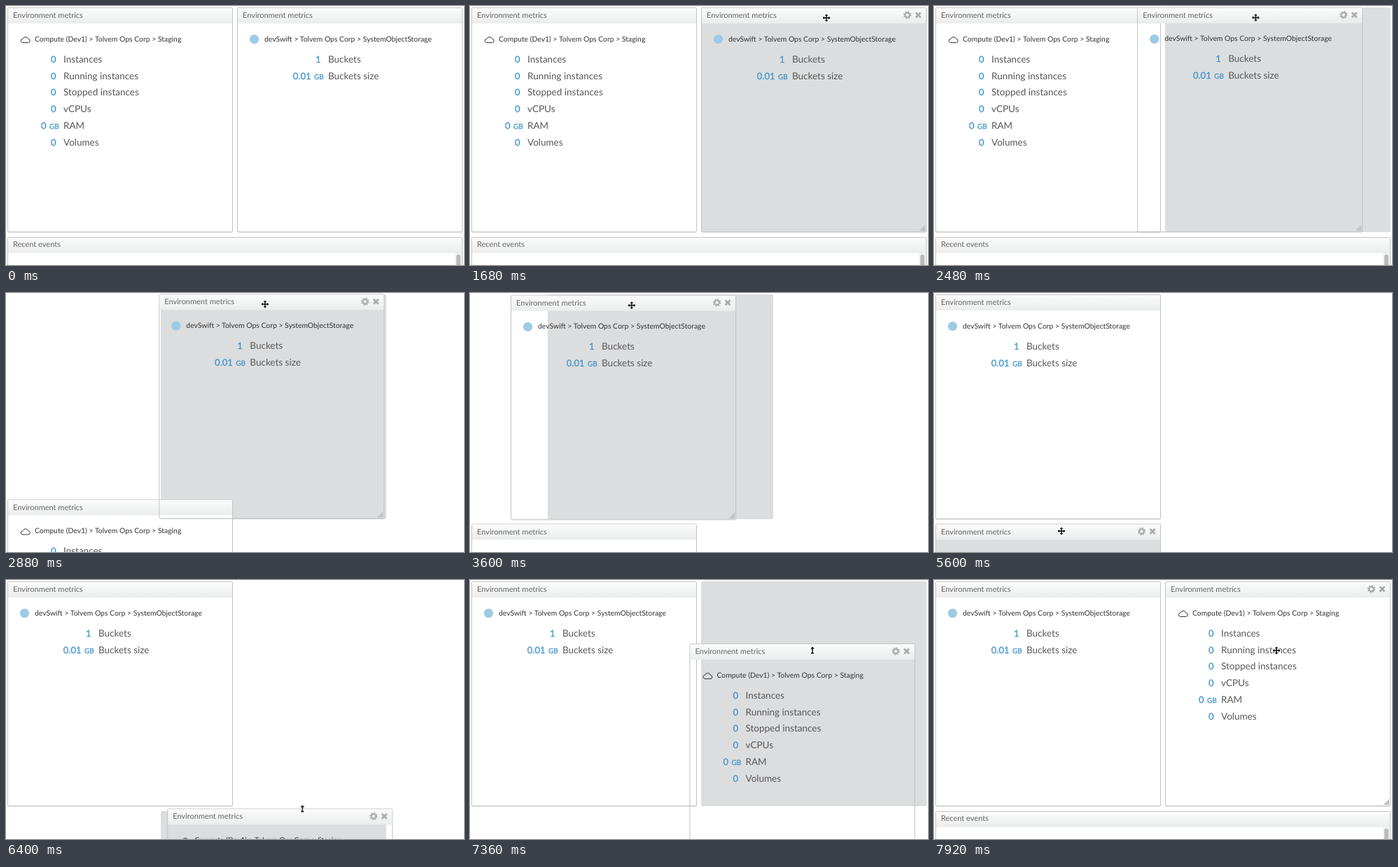
These frames come from a looping animation (654x371 px, 8 s). An HTML page:

```html
<!DOCTYPE html>
<html lang="en">
<head>
<meta charset="utf-8">
<title>Dashboard widgets</title>
<style>
html, body { margin: 0; width: 100%; height: 100%; overflow: hidden; background: #fff; }
.stage { position: relative; width: 654px; height: 371px; overflow: hidden; background: #fff; }

.panel, .slot { position: absolute; top: 2px; left: 2px; box-sizing: border-box; width: 322px; height: 322px; border-radius: 2px; }
.panel { border: 1px solid #c3c4c4; background: #fff; box-shadow: 0 1px 1px rgba(0,0,0,.1); }
.panel::before { content: ""; position: absolute; inset: 0 0 auto; height: 22px; background: linear-gradient(#fbfbfb, #ebeded); }
.panel svg { position: absolute; left: -1px; top: -1px; width: 100%; height: 100%; overflow: visible; }

text { font: 13.5px Lato, "Open Sans", sans-serif; fill: #585858; text-rendering: geometricPrecision; }
.title { font-size: 11px; fill: #666; }
.path { font-size: 10.4px; fill: #333; }
.num { font-size: 13px; text-anchor: end; fill: #3a92cc; stroke: #3a92cc; stroke-width: .25; }
.unit { font-size: 10px; fill: #3a92cc; stroke: #3a92cc; stroke-width: .25; }
.tools { fill: none; stroke: #a6a7a7; }

.slot { background: #dcddde; opacity: 0; animation: slot 8s step-end infinite; }
#compute { z-index: 1; animation: compute 8s infinite, computeLift 8s step-end infinite; }
#buckets { left: 330px; z-index: 2; animation: buckets 8s infinite, bucketsLift 8s step-end infinite; }
#events { top: 331px; width: 650px; height: 200px; animation: events 8s infinite; }
#events i { position: absolute; right: 0; top: 22px; width: 10px; bottom: 0; background: #f2f2f2; }
#events i::after { content: ""; position: absolute; left: 2px; top: 2px; width: 6px; height: 90px; border-radius: 3px; background: #b9baba; }
#compute .tools { animation: computeTools 8s linear infinite; }
#buckets .tools { animation: bucketsTools 8s linear infinite; }

.pointer { position: absolute; left: 0; top: 0; z-index: 9; overflow: visible; animation: pointer 8s infinite; }
.pointer path { stroke: #fff; stroke-width: 1.4; paint-order: stroke; }
.cross { animation: cross 8s step-end infinite; }
.up { animation: up 8s step-end infinite; }

@keyframes buckets {
  0%, 25% { transform: none; animation-timing-function: cubic-bezier(.4,0,.75,.65); }
  36% { transform: translate(-111.5px,-.7px); animation-timing-function: cubic-bezier(.3,.25,.7,.75); }
  47% { transform: translate(-304px,1px); animation-timing-function: ease-out; }
  53%, 56% { transform: translate(-329px,1.5px); }
  57.5%, 100% { transform: translate(-328px,0); }
}
@keyframes bucketsLift {
  0%, 55%, 100% { background: #fff; }
  20.8% { background: transparent; }
}
@keyframes bucketsTools {
  0%, 11% { opacity: 0; }
  14%, 60% { opacity: 1; }
  61.5%, 100% { opacity: 0; }
}
@keyframes compute {
  0%, 32.95% { transform: none; }
  37.95%, 72.5% { transform: translate(0,328.5px); animation-timing-function: cubic-bezier(.4,0,.75,.75); }
  80% { transform: translate(228px,325.5px); animation-timing-function: linear; }
  83.5% { transform: translate(300px,297px); animation-timing-function: cubic-bezier(.3,.2,.6,1); }
  92%, 96.3% { transform: translate(311.5px,89px); }
  98.8%, 100% { transform: translate(328px,0); }
}
@keyframes computeLift {
  0% { background: #fff; z-index: 1; }
  70% { background: transparent; z-index: 3; }
  96.3%, 100% { background: #fff; z-index: 3; }
}
@keyframes computeTools {
  0%, 65% { opacity: 0; }
  66.5%, 100% { opacity: 1; }
}
@keyframes events {
  0%, 32.95% { transform: none; }
  37.95%, 96.3% { transform: translate(0,328px); }
  98.8%, 100% { transform: none; }
}
@keyframes slot {
  0% { opacity: 0; }
  20.8% { opacity: 1; transform: translate(328px,0); }
  32.5% { opacity: 1; transform: translate(219px,0); }
  39.5% { opacity: 1; transform: translate(109px,0); }
  45.5% { opacity: 1; transform: none; }
  55% { opacity: 0; transform: none; }
  70% { opacity: 1; transform: translate(0,329px); }
  75.5% { opacity: 1; transform: translate(109px,329px); }
  78% { opacity: 1; transform: translate(219px,329px); }
  82% { opacity: 1; transform: translate(328px,0); }
  96.3%, 100% { opacity: 0; }
}
@keyframes pointer {
  0%, 4% { transform: translate(560px,4px); opacity: 0; }
  5% { opacity: 1; }
  14%, 25% { transform: translate(509px,17px); animation-timing-function: cubic-bezier(.4,0,.75,.65); }
  36% { transform: translate(370px,16px); animation-timing-function: cubic-bezier(.3,.25,.7,.75); }
  47% { transform: translate(203px,18px); animation-timing-function: ease-out; }
  53%, 59% { transform: translate(180px,18px); animation-timing-function: ease-in-out; }
  67%, 72.5% { transform: translate(182px,341px); animation-timing-function: cubic-bezier(.4,0,.75,.75); }
  80% { transform: translate(423px,328px); animation-timing-function: linear; }
  83.5% { transform: translate(482px,302px); animation-timing-function: cubic-bezier(.3,.2,.6,1); }
  92%, 100% { transform: translate(489px,101px); opacity: 1; }
}
@keyframes cross { 0%, 96.3%, 100% { opacity: 1; } 79.5% { opacity: 0; } }
@keyframes up { 0%, 96.3%, 100% { opacity: 0; } 79.5% { opacity: 1; } }
</style>
</head>
<body>
<div class="stage">
  <div class="slot"></div>

  <div class="panel" id="events">
    <svg><text class="title" x="8" y="14.3">Recent events</text></svg>
    <i></i>
  </div>

  <div class="panel" id="compute">
    <svg>
      <text class="title" x="8" y="15">Environment metrics</text>
      <path d="M21.5 50.5h8a2.6 2.6 0 0 0 .4-5.2 4.2 4.2 0 0 0-7.9-.3 2.8 2.8 0 0 0-.5 5.5z" fill="none" stroke="#333"/>
      <text class="path" x="39" y="48.5">Compute (Dev1) &gt; Tolvem Ops Corp &gt; Staging</text>
      <g class="rows" data-x="80" data-rows="0||Instances;0||Running instances;0||Stopped instances;0||vCPUs;0|GB|RAM;0||Volumes"></g>
      <g class="tools"></g>
    </svg>
  </div>

  <div class="panel" id="buckets">
    <svg>
      <text class="title" x="8" y="15">Environment metrics</text>
      <circle cx="24.5" cy="45.7" r="6.6" fill="#9ccbe5"/>
      <text class="path" x="39" y="48.5">devSwift &gt; Tolvem Ops Corp &gt; SystemObjectStorage</text>
      <g class="rows" data-x="130" data-rows="1||Buckets;0.01|GB|Buckets size"></g>
      <g class="tools"></g>
    </svg>
  </div>

  <svg class="pointer" width="1" height="1">
    <path class="cross" d="M0-5.5L2.3-3H.7V-.7H3V-2.3L5.5 0 3 2.3V.7H.7V3H2.3L0 5.5-2.3 3H-.7V.7H-3V2.3L-5.5 0-3-2.3V-.7H-.7V-3H-2.3Z"/>
    <path class="up" d="M0-5.5L2.8-2.6H.7V3H2V4.5H-2V3H-.7V-2.6H-2.8Z"/>
  </svg>
</div>
<script>
for (const group of document.querySelectorAll('.rows')) {
  const x = +group.dataset.x;
  group.innerHTML = group.dataset.rows.split(';').map((row, i) => {
    const [num, unit, label] = row.split('|');
    const y = 78.7 + i * 23.8;
    return `<text class="num" x="${x - (unit ? 24.5 : 10.5)}" y="${y}">${num}</text>
      <text class="unit" x="${x - 20}" y="${y}">${unit}</text>
      <text x="${x}" y="${y}">${label}</text>`;
  }).join('');
}
for (const tools of document.querySelectorAll('.tools')) {
  tools.innerHTML = `
    <circle cx="294.5" cy="11" r="3.2" stroke-width="2"/>
    <circle cx="294.5" cy="11" r="4.8" stroke-width="1.8" stroke-dasharray="1.9 1.87"/>
    <path d="M306.5 7.5l7 7m0-7l-7 7" stroke-width="2.6"/>
    <path d="M320 311.5v8.5h-8.5z" fill="#c2c3c3" stroke="none"/>`;
}
</script>
</body>
</html>
```
